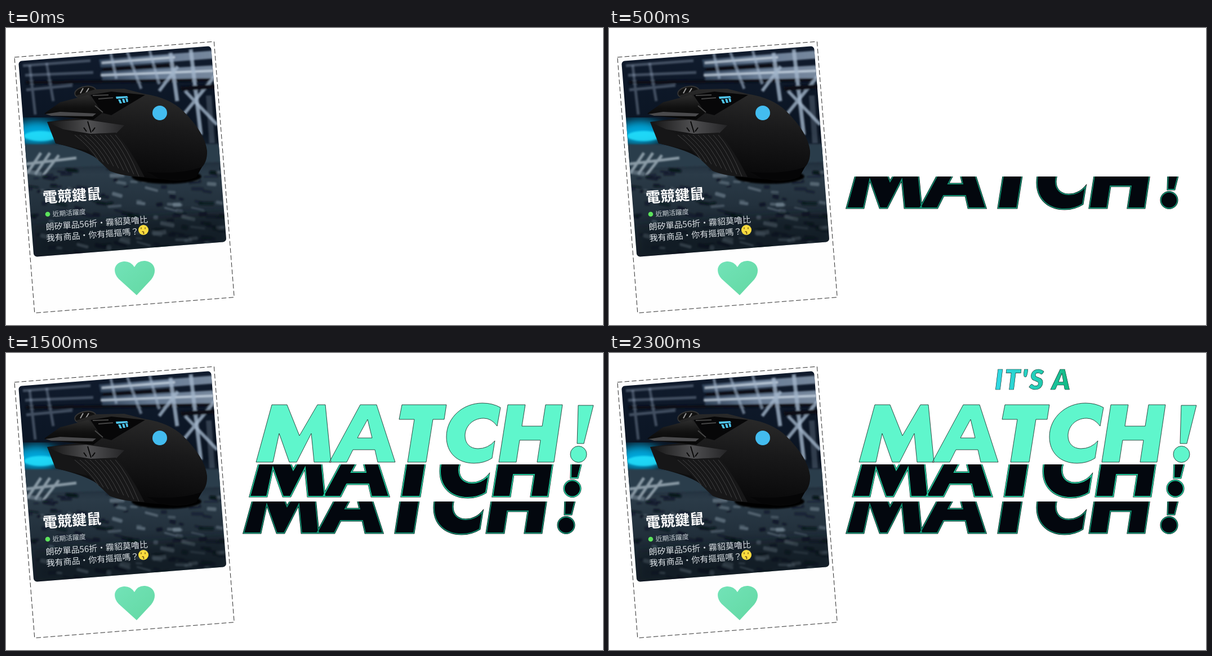
An HTML page that plays this animation: 1060 by 528 pixels, repeating every 2.5 s.

```html
<!DOCTYPE html>
<html lang="zh-Hant">
<head>
<meta charset="utf-8">
<title>Match</title>
<style>
  html, body { margin: 0; width: 100%; height: 100%; overflow: hidden; background: #fff; }
  svg { display: block; width: 1060px; height: 528px; }
  .copy { fill: #fff; font-family: "Noto Sans CJK TC", "Noto Sans CJK JP", "Noto Sans CJK", sans-serif; }
  .light { font-size: 15px; font-weight: 300; fill: #dce2e6; }
  .small { font-size: 11.8px; font-weight: 300; fill: #ccd3d8; }
  .title { font-size: 26px; font-weight: 700; }
  .intro { font: italic 900 49px Lato, sans-serif; }
</style>
</head>
<body>
<svg viewBox="0 0 1060 528">
  <defs>
    <clipPath id="photo"><rect x="6.5" y="7.5" width="343" height="349" rx="6" transform="translate(15 52) rotate(-4.5)"/></clipPath>
    <clipPath id="midSlice"><rect x="420" y="198" width="640" height="64"/></clipPath>
    <clipPath id="lowSlice"><rect x="420" y="264" width="640" height="64"/></clipPath>
    <filter id="soft"><feGaussianBlur stdDeviation="1.5"/></filter>
    <filter id="haze"><feGaussianBlur stdDeviation="9"/></filter>
    <linearGradient id="room" x2="0" y2="1">
      <stop stop-color="#111c2e"/><stop offset=".42" stop-color="#0a1422"/>
      <stop offset=".6" stop-color="#2b3b48"/><stop offset="1" stop-color="#131d27"/>
    </linearGradient>
    <linearGradient id="beam"><stop stop-color="#3d536d"/><stop offset=".45" stop-color="#8ea6c2"/><stop offset="1" stop-color="#a5b8cf"/></linearGradient>
    <linearGradient id="shell" x1=".6" y1="0" x2=".4" y2="1">
      <stop stop-color="#2b2b2b"/><stop offset=".4" stop-color="#19191a"/><stop offset="1" stop-color="#050506"/>
    </linearGradient>
    <linearGradient id="blade" x2="0" y2="1">
      <stop stop-color="#2d2d2d"/><stop offset=".5" stop-color="#111"/><stop offset="1" stop-color="#050505"/>
    </linearGradient>
    <linearGradient id="panel"><stop stop-color="#121212"/><stop offset=".55" stop-color="#505052"/><stop offset="1" stop-color="#242426"/></linearGradient>
    <linearGradient id="mint" x2="1" y2="1"><stop stop-color="#72e3b8"/><stop offset="1" stop-color="#63d8a3"/></linearGradient>
    <linearGradient id="aqua"><stop stop-color="#31d9e6"/><stop offset=".5" stop-color="#25d0bd"/><stop offset="1" stop-color="#12b981"/></linearGradient>
    <path id="match" d="M444 194L472 92H499L521 147L553 92H567L577 194H547L542 143L516 194H503L485 143L474 194Z
      M574 194L629 92H658L691 194H660L655 172H616L605 194Z M624 151H650L642 118Z
      M703 92H782L778 118H758L746 194H713L725 118H698Z
      M878 97L872 130Q862 116 848 116C828 116 815 131 815 147C815 161 824 170 838 170Q856 170 868 156L863 187Q849 196 831 196C802 196 782 178 782 149C782 114 812 89 846 89Q864 89 878 97Z
      M875 194L891 92H922L916 130H952L958 92H988L973 194H943L949 155H912L906 194Z
      M1016 93H1043L1026 161H1014Z M1002 180a14.5 14.5 0 1 0 29 0a14.5 14.5 0 1 0-29 0Z" fill-rule="evenodd"/>
  </defs>

  <g transform="translate(15 52) rotate(-4.5)">
    <rect width="355.5" height="456" fill="#fefefe" stroke="#000" stroke-width=".8" stroke-dasharray="8.5 4.2"/>
  </g>

  <g clip-path="url(#photo)">
    <rect x="10" y="20" width="400" height="400" fill="url(#room)"/>
    <g filter="url(#soft)" fill="none" stroke="#a3b6cb">
      <path d="M165 56L370 40L372 54L168 70ZM168 78L375 66V90L172 96Z" fill="url(#beam)" stroke="none" opacity=".7"/>
      <path d="M35 97L375 92M172 74L300 66" stroke="#070d17" stroke-width="6"/>
      <path d="M168 84L370 76M170 62L300 52" stroke="#d4e0ec" stroke-width="4" opacity=".75"/>
      <path d="M30 67L150 58M34 84L155 79" stroke-width="5" opacity=".35"/>
      <path d="M215 42L240 108M255 40L272 100M186 45L196 90" stroke-width="5" opacity=".6"/>
      <path d="M292 44L304 130M328 38L346 190" stroke-width="7" opacity=".8"/>
      <path d="M312 158L372 84M318 112L375 172M272 112L305 68" stroke-width="6" opacity=".8"/>
      <path d="M310 108L372 104" stroke="#070d17" stroke-width="8"/>
      <path d="M72 62L84 130M42 66L52 154M36 110L118 102" stroke-width="5" opacity=".35"/>
      <path d="M360 120L366 205" stroke-width="10" opacity=".25"/>
    </g>
    <ellipse cx="55" cy="186" rx="40" ry="22" fill="#05a8dc" filter="url(#haze)"/>
    <ellipse cx="62" cy="192" rx="30" ry="9" fill="#25e4ff" filter="url(#soft)" opacity=".8"/>
    <path d="M20 207L390 206V238L30 250Z" fill="#2b3d4c" filter="url(#soft)"/>
    <path d="M38 258L62 222M52 260L78 222M66 262L94 226M34 242L125 231" stroke="#b3c2cc" stroke-width="5" opacity=".7" filter="url(#soft)"/>
    <g id="keys" filter="url(#soft)"/>
    <path d="M48 350L395 325V390L50 410Z" fill="#0a121b" opacity=".45" filter="url(#haze)"/>
    <ellipse cx="285" cy="264" rx="62" ry="13" fill="#020406" filter="url(#soft)"/>
  </g>

  <g>
    <ellipse cx="141" cy="114" rx="19" ry="10" fill="#111" stroke="#333" stroke-width="2" transform="rotate(-10 141 114)"/>
    <path d="M132 116L137 107M141 117L147 107" stroke="#999" stroke-width="2"/>
    <path d="M125 120L158 109L210 108L245 117Q291 124 315 148Q353 186 357 218Q358 240 344 251L338 265Q313 275 280 269Q225 266 185 254L160 231Q139 217 88 205L73 167L150 157Z" fill="url(#shell)"/>
    <path d="M68 152L96 132L146 119L172 150L155 163L78 156Z" fill="url(#blade)"/>
    <path d="M70 153L96 149L160 152L154 157L80 156Z" fill="#4a4a4c"/>
    <path d="M150 119L187 113L247 119L187 155L171 151Z" fill="#070708"/>
    <path d="M154 120L182 119M164 126L190 124M158 138L172 150" stroke="#464646" stroke-width="2"/>
    <path d="M73 167L142 163L210 173L196 187L150 188L88 178Z" fill="url(#panel)"/>
    <path d="M74 168L88 205L145 218L124 190Z" fill="#161617"/>
    <path d="M145 166L151 186M138 177L143 184M158 177L153 184" stroke="#090909" stroke-width="2"/>
    <path d="M120 190Q158 188 195 186Q220 213 246 265Q207 264 184 254L160 231Z" fill="#171718"/>
    <path id="ribs" fill="none" stroke="#414142"/>
    <path d="M195 122L215 121L217 124L196 126ZM199 127L203 127L206 134L202 134ZM206 126L210 126L212 133L208 133ZM212 125L216 125L217 131L214 132Z" fill="#4fc5ee"/>
    <path d="M251 256Q310 261 348 247L338 265Q308 274 271 267Z" fill="#050506"/>
    <circle cx="273" cy="151" r="13" fill="#43bcef"/>
  </g>

  <g class="copy">
    <text class="title" transform="translate(66 311) rotate(-4.2)">電競鍵鼠</text>
    <circle cx="74" cy="331" r="4.3" fill="#5ce35c"/>
    <text class="small" transform="translate(83 335) rotate(-4.2)">近期活躍度</text>
    <text class="light" transform="translate(71 359) rotate(-4.2)">朗矽單品56折・霧貂莫嚕比</text>
    <text class="light" transform="translate(72 379) rotate(-4.2)">我有商品・你有摳摳嗎？</text>
  </g>
  <circle cx="244" cy="359" r="9" fill="#fbdc3e"/>
  <path d="M240 355v2M247 355v2M242 362q4 0 2 2q2 1 0 2" fill="none" stroke="#684a16" stroke-width="1.3" stroke-linecap="round"/>
  <path d="M232 475L200 446C188 433 192 417 209 415Q221 414 228 425Q234 413 247 414C265 416 269 433 258 447Z" fill="url(#mint)"/>

  <g class="layer" clip-path="url(#lowSlice)">
    <g transform="translate(-22 126)" fill="#03070e">
      <use href="#match" stroke="#000" stroke-width="3"/><use href="#match" stroke="#118e70" stroke-width="1.8"/>
    </g>
  </g>
  <g class="layer" clip-path="url(#midSlice)">
    <g transform="translate(-11 61)" fill="#03070e">
      <use href="#match" stroke="#000" stroke-width="3"/><use href="#match" stroke="#20c397" stroke-width="2"/>
    </g>
  </g>
  <use class="layer" href="#match" fill="#5ff6cc" stroke="#10241e" stroke-width=".8"/>
  <text class="layer intro" x="685" y="65" fill="url(#aqua)" stroke="#10241e" stroke-width=".6" textLength="134">IT'S A</text>
</svg>
<script>
  const STEP = 500, LOOP = 2500;
  const layers = [...document.querySelectorAll('.layer')];

  let seed = 7;
  const random = () => (seed = seed * 16807 % 2147483647) / 2147483647;
  let keys = '';
  for (let i = 0; i < 150; i++) {
    const x = 35 + random() * 360, y = 245 + random() * 155;
    const angle = -8 + random() * 26, width = 8 + random() * 20;
    keys += `<rect x="${x}" y="${y}" width="${width}" height="${3 + random() * 5}" rx="2"
      transform="rotate(${angle} ${x} ${y})" fill="${i % 3 ? '#060c13' : '#7c8d9b'}" opacity="${.3 + random() * .3}"/>`;
  }
  document.getElementById('keys').innerHTML = keys;

  let ribs = '';
  for (let i = 0; i < 9; i++) ribs += `M${122 + i * 9} 190Q${151 + i * 8} 213 ${164 + i * 9} ${235 + i * 3.6}`;
  document.getElementById('ribs').setAttribute('d', ribs);

  function draw() {
    const step = Math.floor(performance.now() % LOOP / STEP);
    layers.forEach((layer, i) => layer.style.visibility = i < step ? 'visible' : 'hidden');
    requestAnimationFrame(draw);
  }
  draw();
</script>
</body>
</html>
```
